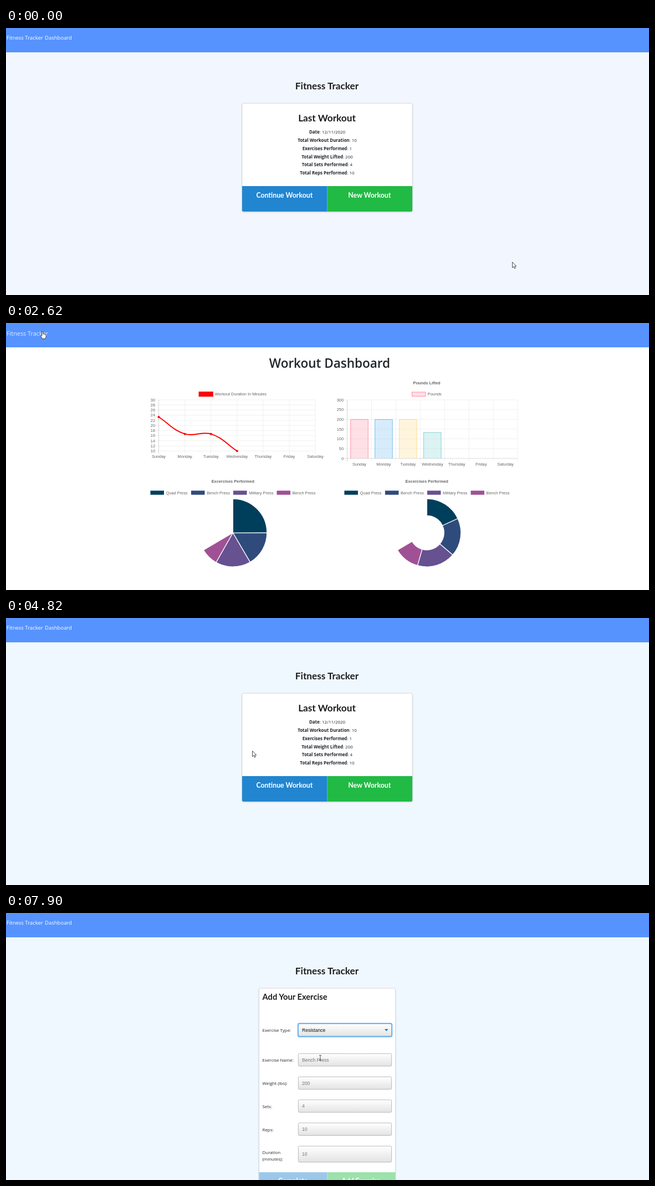
Recreate the animation shown at these times as an HTML page. Size 1160 px wide and 483 px high, loop 8 s.

```html
<!DOCTYPE html>
<html lang="en">
<head>
<meta charset="utf-8">
<title>Fitness Tracker</title>
<style>
html, body { margin: 0; width: 100%; height: 100%; overflow: hidden; }
svg { display: block; }
text { font: 7.95px "Open Sans", "Noto Sans", sans-serif; fill: #212529; white-space: pre; }
tspan { font-weight: 700; }
.m { text-anchor: middle; }
.e { text-anchor: end; }
.nav { font-size: 9.5px; fill: #fff; }
.brand { font-size: 10.85px; fill: #e4eeff; }
.title { font-size: 22.5px; font-weight: 600; }
.h1, .h2, .btn { font-family: Lato, sans-serif; font-weight: 700; fill: #1c1d1e; }
.h1 { font-size: 17.2px; }
.h2 { font-size: 14.7px; }
.btn { font-size: 12.3px; fill: #fff; }
.in, .ph { font: 8.55px "Liberation Sans", Arial, sans-serif; fill: #111; }
.ph { fill: #757575; }
.ch, .cb { font: 7.36px "Liberation Sans", Arial, sans-serif; fill: #666; }
.cb { font-weight: 700; }
</style>
</head>
<body>
<svg id="stage" width="1160" height="483" viewBox="0 0 1160 483"></svg>
<script>
const LOOP = 8000;
const stage = document.getElementById('stage');
const $ = id => document.getElementById(id);
const show = (id, on) => $(id).setAttribute('display', on ? 'inline' : 'none');
const set = (id, name, value) => $(id).setAttribute(name, value);

const text = (x, y, cls, s, more = '') => `<text x="${x}" y="${y}" class="${cls}" ${more}>${s}</text>`;
const rect = (x, y, w, h, fill, more = '') =>
  `<rect x="${x}" y="${y}" width="${w}" height="${h}" fill="${fill}" ${more}/>`;
const line = (d, stroke, w = 0.613) => `<path d="${d}" fill="none" stroke="${stroke}" stroke-width="${w}"/>`;
const range = n => [...Array(n).keys()];

// Charts
const GRID = 'rgba(0,0,0,.1)', AXIS = 'rgba(0,0,0,.25)';
const DAYS = ['Sunday', 'Monday', 'Tuesday', 'Wednesday', 'Thursday', 'Friday', 'Saturday'];
const MINUTES = [30, 20, 20, 10], POUNDS = [300, 300, 300, 200];
const BAR_RGB = ['255,99,132', '54,162,235', '255,206,86', '75,192,192'];
const SLICES = ['#003f5c', '#2f4b7c', '#665191', '#a05195'];
const LIFTS = [['Quad Press', 260.5], ['Bench Press', 334], ['Military Press', 410], ['Bench Press', 488.5]];
const PIES = [[409.3, 0], [759.2, 31]];
const dayX = i => 275.5 + i * 47.1;
const catX = i => 615.5 + i * 43.93;

function lineAxes() {
  const rows = range(11).map(i => {
    const y = 139 + i * 9.25;
    return line(`M270 ${y}H558`, GRID) + text(269, y + 2.6, 'ch e', 30 - 2 * i);
  });
  const cols = DAYS.map((d, i) =>
    line(`M${dayX(i)} 139V237`, i ? GRID : AXIS) + text(dayX(i), 244.2, 'ch m', d));
  return rows.join('') + cols.join('') +
    rect(348.5, 125, 24.5, 7.4, 'red', 'stroke="red" stroke-width="1.8"') +
    text(376.8, 131.3, 'ch', 'Workout Duration In Minutes');
}

function barAxes() {
  const rows = range(7).map(i => {
    const y = 139 + i * 17.67;
    return line(`M609.5 ${y}H923`, i < 6 ? GRID : AXIS) + text(609, y + 2.6, 'ch e', 300 - 50 * i);
  });
  const cols = range(8).map(i => line(`M${catX(i)} 139V251`, i ? GRID : AXIS) +
    (i < 7 ? text(catX(i + 0.5), 257.8, 'ch m', DAYS[i]) : ''));
  return rows.join('') + cols.join('') + text(759, 111.2, 'cb m', 'Pounds Lifted') +
    rect(732.5, 125, 24.5, 7.4, 'rgba(255,99,132,.2)', 'stroke="rgb(255,99,132)" stroke-width=".7"') +
    text(760.8, 131.3, 'ch', 'Pounds');
}

const pieLegend = dx => text(409.3 + dx, 289.3, 'cb m', 'Excercises Performed') +
  LIFTS.map(([name, x], i) => rect(x + dx, 303.3, 24.5, 7.4, SLICES[i]) +
    text(x + dx + 28.2, 309.5, 'ch', name)).join('');

function handles(a, b, c) {
  const before = Math.hypot(b[0] - a[0], b[1] - a[1]);
  const after = Math.hypot(c[0] - b[0], c[1] - b[1]);
  const f = 0.4 / (before + after), dx = c[0] - a[0], dy = c[1] - a[1];
  const cap = y => Math.min(231.5, Math.max(139, y));
  return [
    [b[0] - f * before * dx, cap(b[1] - f * before * dy)],
    [b[0] + f * after * dx, cap(b[1] + f * after * dy)]
  ];
}

function lineShape(e) {
  const pts = MINUTES.map((v, i) => [dayX(i), 231.5 - (v - 10) * 4.625]);
  const grow = ([x, y]) => `${x} ${231.5 + (y - 231.5) * e}`;
  const h = pts.map((p, i) => handles(pts[i - 1] || p, p, pts[i + 1] || p));
  const d = pts.map((p, i) => i
    ? `C${grow(h[i - 1][1])} ${grow(h[i][0])} ${grow(p)}` : 'M' + grow(p)).join('');
  return line(d, 'red', 1.84) + pts.map(p => {
    const [x, y] = grow(p).split(' ');
    return `<circle cx="${x}" cy="${y}" r="2.1" fill="red"/>`;
  }).join('');
}

const barShapes = e => POUNDS.map((v, i) => {
  const x = catX(i + 0.5) - 15.8, top = 245 - v * 0.3533 * e;
  return `<path d="M${x} 245V${top}h31.6V245" fill="rgba(${BAR_RGB[i]},.2)" stroke="rgb(${BAR_RGB[i]})" stroke-width=".65"/>`;
}).join('');

function pieShape([cx, inner], data, e) {
  const total = data.reduce((a, b) => a + b);
  const at = (r, a) => `${cx + r * Math.sin(a)} ${379.5 - r * Math.cos(a)}`;
  let a = 0;
  return data.map((v, i) => {
    const b = a + v / total * 2 * Math.PI * e;
    const d = `M${at(inner, a)}L${at(61.5, a)}A61.5 61.5 0 0 1 ${at(61.5, b)}L${at(inner, b)}` +
      (inner ? `A${inner} ${inner} 0 0 0 ${at(inner, a)}Z` : 'Z');
    a = b;
    return `<path d="${d}" fill="${SLICES[i]}" stroke="#fff" stroke-width="1.25" stroke-linejoin="bevel"/>`;
  }).join('');
}

const drawCharts = e => lineShape(e) + barShapes(e) +
  pieShape(PIES[0], MINUTES, e) + pieShape(PIES[1], POUNDS, e);

// Pages
const STATS = [['Date', '12/11/2020'], ['Total Workout Duration', 10], ['Exercises Performed', 1],
  ['Total Weight Lifted', 200], ['Total Sets Performed', 4], ['Total Reps Performed', 10]];
const FIELDS = [['Exercise Name:', 'Bench Press', 254], ['Weight (lbs):', 200, 296], ['Sets:', 4, 337.6],
  ['Reps:', 10, 379.4], ['', 10, 421.3]];
const card = (id, x, w, h) =>
  rect(x, 136.2, w, h, '#fff', `id="${id}" rx="2.5" stroke="#d0d3d7" stroke-width=".7" filter="url(#shade)"`);
const field = (y, h) => rect(527.4, y + 0.4, 168.2, h, 'url(#gloss)', 'rx="2" stroke="#aaa" stroke-width=".8"');

const home = card('homeCard', 426, 307, 195.6) + text(579, 169, 'h1 m', 'Last Workout') +
  '<g id="stats">' + STATS.map(([k, v], i) =>
    text(579.5, 191.4 + i * 14.75, 'm', `<tspan>${k}</tspan>: ${v}`)).join('') + '</g>' +
  '<g id="homeBtns">' +
  '<path id="cont" d="M426 286H579.5V332H428.5Q426 332 426 329.5Z"/>' +
  '<path d="M579.5 286H733V329.5Q733 332 730.5 332H579.5Z" fill="#21ba45"/>' +
  text(502.3, 306.6, 'btn m', 'Continue Workout') + text(655.8, 306.6, 'btn m', 'New Workout') + '</g>';

const form = card('formCard', 456.5, 246, 136.8) + text(462.5, 157, 'h2', 'Add Your Exercise') +
  text(462.5, 215.4, '', 'Exercise Type:') + field(200, 22.6) +
  rect(526.9, 199.8, 169.2, 23.8, 'none', 'id="focus" rx="2.5" stroke="#6db3f2" stroke-width="2.2"') +
  text(534, 214.9, 'in', '', 'id="choice"') + '<path d="M683 210h6.6l-3.3 3.7Z" fill="#007cb2"/>' +
  '<g id="fields">' + FIELDS.map(([label, hint, y], i) => {
    const h = i < 4 ? 22.6 : 29;
    return text(462.5, y + 15.4, '', label) + field(y, h) + text(534, y + h / 2 + 3.4, 'ph', hint);
  }).join('') + text(462.5, 436.4, '', 'Duration') + text(462.5, 448, '', '(minutes):') + '</g>' +
  '<g id="formBtns">' +
  '<path d="M456.5 242H579.5V273H459Q456.5 273 456.5 270.5Z" fill="#9bc8ea"/>' +
  '<path d="M579.5 242H702.5V270.5Q702.5 273 700 273H579.5Z" fill="#9ce2ab"/>' +
  text(517.6, 262.4, 'btn m', 'Complete') + text(640.5, 262.4, 'btn m', 'Add Exercise') + '</g>' +
  '<g id="list">' + rect(527.4, 224, 168.2, 38.2, '#fff', 'stroke="#888" stroke-width=".6"') +
  rect(527.8, 224.3, 167.4, 12.6, '#1e90ff', 'id="mark"') +
  ['Select Exercise Type', 'Resistance', 'Cardio'].map((s, i) =>
    text(534, 233.6 + i * 12.6, 'in', s, `id="opt${i}"`)).join('') + '</g>';

const cursors = '<g id="cursor" stroke="#111" stroke-width=".75" stroke-linejoin="round" fill="#fff">' +
  '<path id="arrow" d="M0 0V10.2L2.4 8L4 11.6L5.6 10.9L4.1 7.4H7.2Z"/>' +
  '<path id="hand" d="M-1.1 8V1Q0 -.6 1.1 1V5Q2.3 4.4 3 5.3Q4 4.9 4.7 5.8Q6 5.5 6.2 7V10Q5.8 12 4.8 13.4H-.4Q-1.6 11 -3.2 8.8Q-3.4 7.2 -2 7.4Z"/>' +
  '<path id="beam" d="M-2 -4.5H-.5L0 -4L.5 -4.5H2M0 -4V4.2M-2 4.7H-.5L0 4.2L.5 4.7H2" fill="none"/></g>';

stage.innerHTML = `<defs>
  <linearGradient id="gloss" x2="0" y2="1"><stop stop-color="#fff"/><stop offset="1" stop-color="#e3e3e3"/></linearGradient>
  <filter id="shade" x="-5%" y="-5%" width="110%" height="112%"><feDropShadow dx="0" dy="1" stdDeviation="1" flood-color="#b4b8be" flood-opacity=".8"/></filter>
  </defs>` + rect(0, 0, 1160, 483, '#fff', 'id="bg"') + rect(0, 0, 1160, 44, '#5693ff') +
  '<g id="site">' + text(1, 20.5, 'nav', 'Fitness Tracker') + text(70, 20.5, 'nav', 'Dashboard', 'id="dashLink"') +
  text(579, 110.8, 'h1 m', 'Fitness Tracker') + '</g>' +
  `<g id="home">${home}</g><g id="form">${form}</g>` +
  '<g id="dash">' + text(1, 23.2, 'brand', 'Fitness Tracker') + text(584, 81, 'title m', 'Workout Dashboard') +
  '<g id="charts">' + lineAxes() + barAxes() + pieLegend(0) + pieLegend(349.9) + '<g id="data"></g></g></g>' +
  '<circle id="ring" r="9.5" fill="#ff0" fill-opacity=".47"/>' + cursors;

// Pointer: first change, last change, steps, end point
const START = [913.5, 423.5];
const MOVES = [
  [100, 850, 8, 127, 23.5], [970, 1190, 3, 95, 9], [1300, 1410, 2, 79.5, 15],
  [2290, 3060, 8, 52.5, 15], [3610, 3610, 1, 52, 15], [4180, 4820, 7, 444.5, 240.5],
  [4940, 5264, 4, 505, 304], [5820, 6480, 7, 557.5, 226.5], [6580, 6580, 1, 558.5, 213.5],
  [7010, 7360, 4, 560, 239.5], [7680, 7900, 3, 567, 262]
];
const CLICKS = [[1960, 2070], [3710, 3850], [5372, 5480], [6690, 6800], [7570, 7680]];
const smooth = u => u * u * (3 - 2 * u);

function pointer(t) {
  let [x, y] = START;
  for (const [t0, t1, n, tx, ty] of MOVES) {
    if (t < t0) break;
    const gap = (t1 - t0) / (n - 1) || 1;
    const k = Math.min(n, Math.floor((t - t0) / gap + 1e-6) + 1);
    const u = smooth(k / n);
    x += (tx - x) * u;
    y += (ty - y) * u;
  }
  return [x, y];
}

function draw(t) {
  const dash = t >= 2290 && t < 4050, form = t >= 5710, filled = t >= 7680;
  const home = !dash && !form, empty = t >= 4050 && t < 4180;
  const [x, y] = pointer(t);
  set('bg', 'fill', dash ? '#fff' : t < 2290 ? '#f2f7ff' : '#f0f8ff');
  show('site', !dash);
  show('home', home);
  show('form', form);
  show('dash', dash);

  const onLink = y < 25 && (dash ? x < 77 : x < 120);
  const onCont = home && y > 286 && x > 426 && x < 579;
  $('dashLink').style.fill = onLink && x > 70 ? '#c8dcff' : '#fff';

  show('stats', !empty);
  set('homeCard', 'height', empty ? 101.6 : 195.6);
  set('homeBtns', 'transform', `translate(0 ${empty ? -94 : 0})`);
  set('cont', 'fill', onCont ? '#1678c2' : '#2185d0');

  if (dash) {
    const k = Math.floor((t - 2290) / 108.75 + 1e-6);
    const p = Math.min(1, Math.max(0, (k - 0.8) * 0.10875));
    show('charts', k > 0);
    $('data').innerHTML = drawCharts(1 - (1 - p) ** 4);
  }

  const open = t >= 6690 && !filled, pick = y > 237 ? 1 : 0;
  show('focus', t >= 6690);
  show('list', open);
  set('mark', 'y', 224.3 + pick * 12.6);
  range(3).forEach(i => { $('opt' + i).style.fill = i === pick ? '#fff' : '#111'; });
  $('choice').textContent = filled ? 'Resistance' : 'Select Exercise Type';
  show('fields', filled);
  set('formCard', 'height', filled ? 363.8 : 136.8);
  set('formBtns', 'transform', `translate(0 ${filled ? 227 : 0})`);

  const beam = filled && y > 254, hand = onLink || onCont;
  show('beam', beam);
  show('hand', hand);
  show('arrow', !beam && !hand);
  set('cursor', 'transform', `translate(${x} ${y})`);
  show('ring', CLICKS.some(([a, b]) => t >= a && t < b));
  set('ring', 'transform', `translate(${x - 0.5} ${y - 0.5})`);
}

const began = performance.now();
function tick() {
  draw((performance.now() - began) % LOOP);
  requestAnimationFrame(tick);
}
tick();
</script>
</body>
</html>
```
